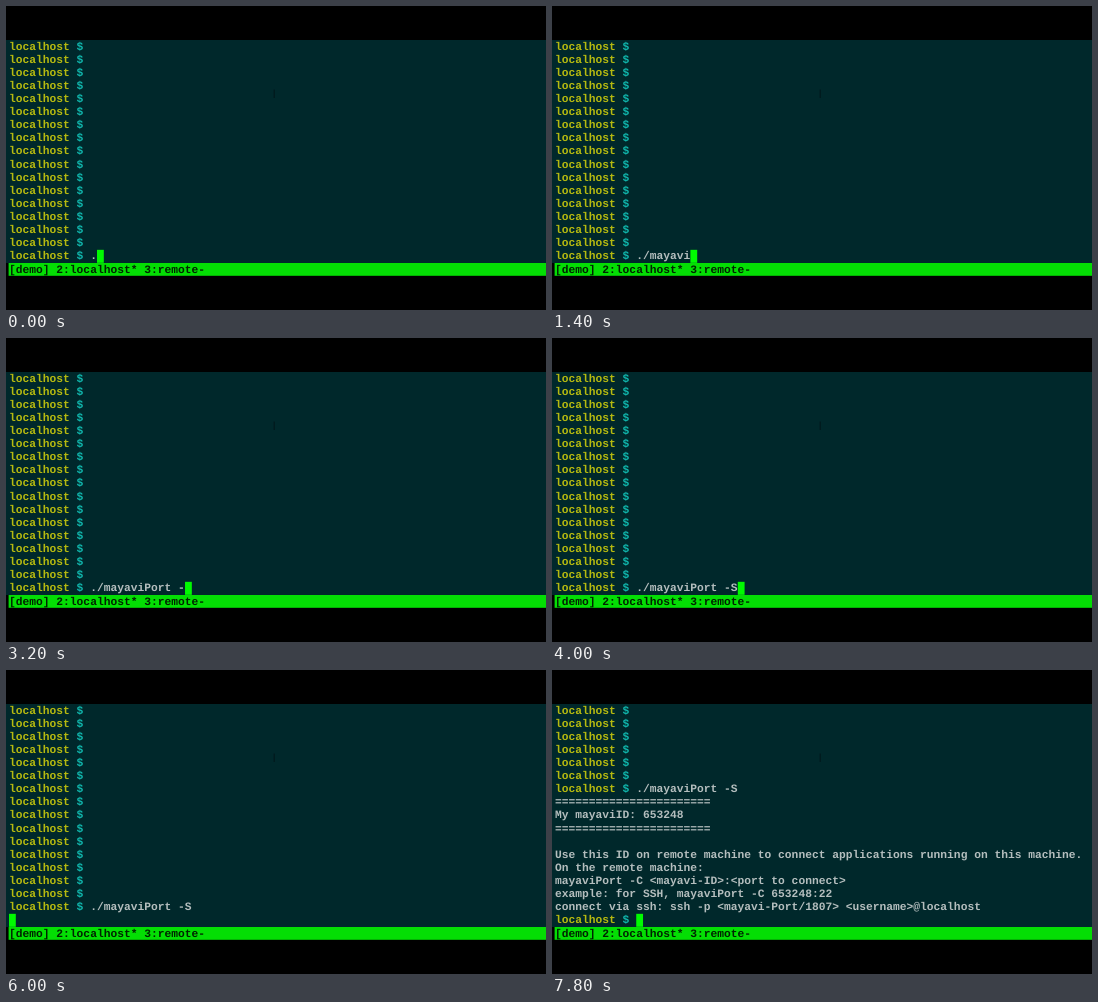
An HTML page that plays this animation: 540 px wide and 304 px high, repeating every 8000 ms.

```html
<!DOCTYPE html>
<html lang="en">
<head>
<meta charset="utf-8">
<title>Terminal</title>
<style>
html, body { margin: 0; width: 100%; height: 100%; overflow: hidden; background: #000; }
svg { display: block; width: 100%; height: 100%; }
text { font: bold 11.28px "Liberation Mono", "DejaVu Sans Mono", monospace; white-space: pre; text-rendering: geometricPrecision; }
.out { fill: #b4bebe; }
.host { fill: #b6ba10; }
.sign { fill: #10b8ae; }
.bar { fill: #002400; }
</style>
</head>
<body>
<svg viewBox="0 0 540 304" id="stage">
  <rect width="540" height="304" fill="#000"/>
  <rect y="34" width="540" height="223" fill="#00282b"/>
  <rect x="2.6" y="257" width="537.4" height="12.8" fill="#04de04"/>
  <text class="bar" x="3" y="266.6">[demo] 2:localhost* 3:remote-</text>
  <g id="screen"></g>
  <rect id="cursor" width="6.8" height="13" fill="#00fa00"/>
  <path d="M268.2 83.5V92" stroke="#00161a"/>
</svg>
<script>
const LOOP = 8000, ROWS = 17, LEFT = 3, BASE = 43.9, CHAR = 6.77, LINE = 13.07;
const HOST = "localhost", PROMPT = HOST + " $ ";
const COMMAND = "./mayaviPort -S";
const KEYS = [0, 200, 400, 600, 800, 1000, 1200, 1400, 1800, 2000, 2200, 2400, 2800, 3000, 3400];
const ENTER = 5400, PRINT = 7600;
const RULE = "=".repeat(23);
const OUTPUT = [
  RULE,
  "My mayaviID: 653248",
  RULE,
  "",
  "Use this ID on remote machine to connect applications running on this machine.",
  "On the remote machine:",
  "mayaviPort -C <mayavi-ID>:<port to connect>",
  "example: for SSH, mayaviPort -C 653248:22",
  "connect via ssh: ssh -p <mayavi-Port/1807> <username>@localhost"
];

const NS = "http://www.w3.org/2000/svg";
const screen = document.getElementById("screen");
const cursor = document.getElementById("cursor");
cursor.setAttribute("y", BASE + (ROWS - 1) * LINE - 9.2);

const rows = Array.from({ length: ROWS }, (_, i) => {
  const text = document.createElementNS(NS, "text");
  text.setAttribute("x", LEFT);
  text.setAttribute("y", BASE + i * LINE);
  screen.append(text);
  return text;
});

function span(cls, content) {
  const el = document.createElementNS(NS, "tspan");
  el.setAttribute("class", cls);
  el.textContent = content;
  return el;
}

function setRow(row, line) {
  if (row.dataset.line === line) return;
  row.dataset.line = line;
  row.replaceChildren(...(line.startsWith(PROMPT)
    ? [span("host", HOST), span("sign", " $ "), span("out", line.slice(PROMPT.length))]
    : [span("out", line)]));
}

function linesAt(t) {
  const typed = COMMAND.slice(0, KEYS.filter(k => k <= t).length);
  const lines = Array(ROWS - 1).fill(PROMPT).concat(PROMPT + typed);
  if (t >= PRINT) lines.push(...OUTPUT, PROMPT);
  else if (t >= ENTER) lines.push("");
  return lines.slice(-ROWS);
}

function render(t) {
  const lines = linesAt(t);
  rows.forEach((row, i) => setRow(row, lines[i]));
  cursor.setAttribute("x", LEFT + lines[ROWS - 1].length * CHAR);
}

const start = performance.now();
function tick() {
  render((performance.now() - start) % LOOP);
  requestAnimationFrame(tick);
}
tick();
</script>
</body>
</html>
```
